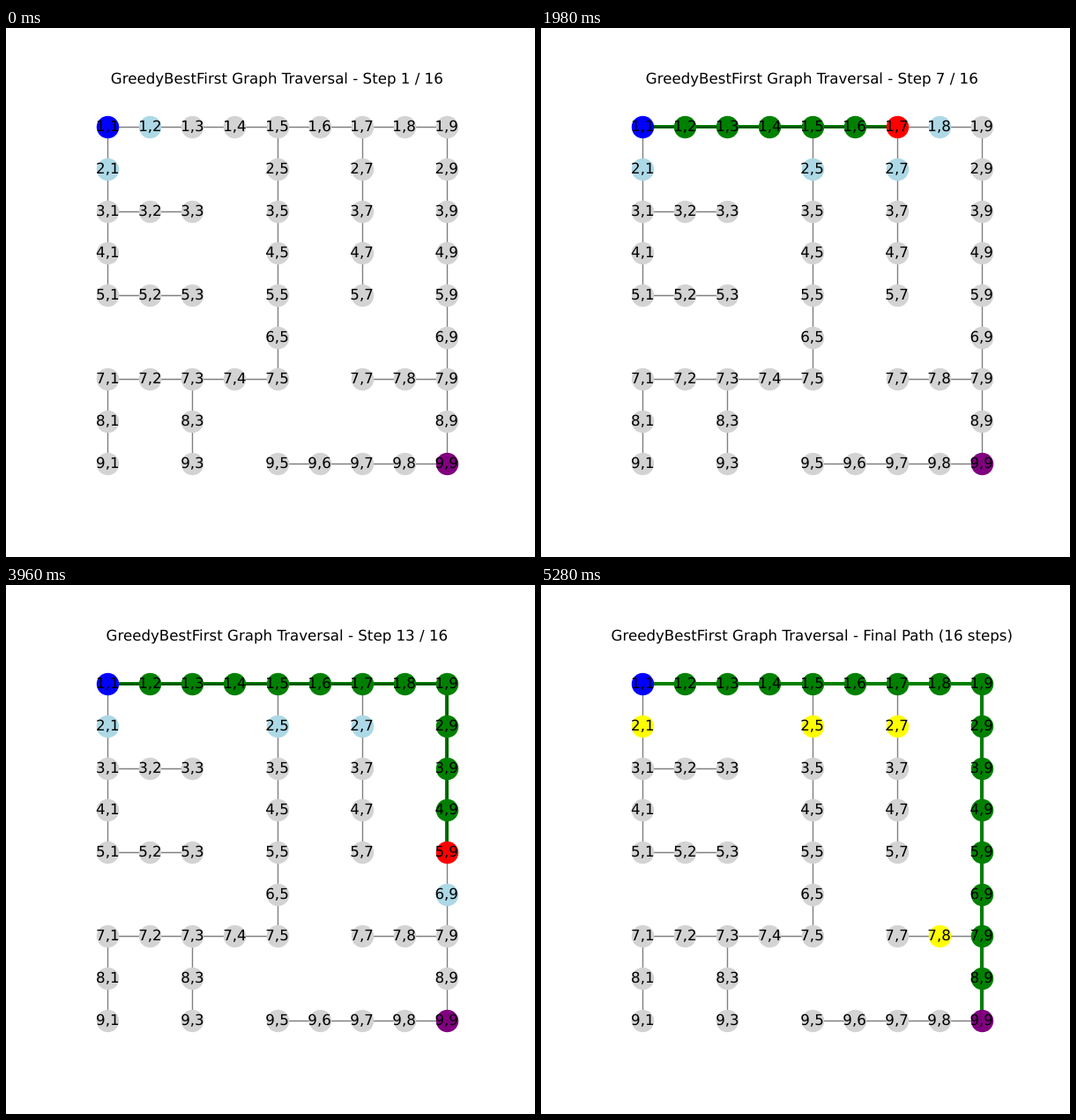
Recreate the animation shown at these times as an HTML page. Size 600 px wide and 600 px high, loop 5610 ms.

```html
<!DOCTYPE html>
<html lang="en">
<head>
<meta charset="utf-8">
<title>Graph traversal</title>
<style>
  html, body { margin: 0; width: 100%; height: 100%; overflow: hidden; background: #fff; }
  svg { display: block; width: 600px; height: 600px; }
  text { font: 16.667px "DejaVu Sans", sans-serif; text-anchor: middle; text-rendering: geometricPrecision; }
</style>
</head>
<body>
<svg id="stage" viewBox="0 0 600 600"></svg>
<script>
const STEP_MS = 330, STEPS = 16;
const stage = document.getElementById('stage');

// Straight corridors of the maze: [row, column, row, column]
const corridors = [
  [1, 1, 1, 9], [3, 1, 3, 3], [5, 1, 5, 3], [7, 1, 7, 5], [7, 7, 7, 9], [9, 5, 9, 9],
  [1, 1, 5, 1], [7, 1, 9, 1], [7, 3, 9, 3], [1, 5, 7, 5], [1, 7, 5, 7], [1, 9, 9, 9]
];

const exactX = col => 307.5 + (col - 5) * 465 / 1.21 / 8;
const nodeX = col => Math.round(exactX(col));
const nodeY = row => Math.round(303 + (row - 5) * 462 / 1.21 / 8);

function add(tag, attrs, parent = stage) {
  const el = document.createElementNS('http://www.w3.org/2000/svg', tag);
  for (const name in attrs) el.setAttribute(name, attrs[name]);
  return parent.appendChild(el);
}

const nodes = new Map();
const keyOf = (row, col) => row + ',' + col;

function nodeAt(row, col) {
  const key = keyOf(row, col);
  if (!nodes.has(key)) nodes.set(key, { key, row, col, links: [] });
  return nodes.get(key);
}

for (const [r1, c1, r2, c2] of corridors) {
  const dr = Math.sign(r2 - r1), dc = Math.sign(c2 - c1);
  for (let r = r1, c = c1; r !== r2 || c !== c2; r += dr, c += dc) {
    const a = nodeAt(r, c), b = nodeAt(r + dr, c + dc);
    a.links.push(b);
    b.links.push(a);
  }
}

const route = Array.from({ length: STEPS + 1 }, (_, i) =>
  nodeAt(Math.max(1, i - 7), Math.min(9, i + 1)));
const start = route[0], goal = route[STEPS];

const pathStyle = { fill: 'none', stroke: '#008000', 'stroke-width': 4.17 };
const pathBelow = add('polyline', pathStyle);
for (const [r1, c1, r2, c2] of corridors) {
  add('line', {
    x1: nodeX(c1) + .5, y1: nodeY(r1) + .5, x2: nodeX(c2) + .5, y2: nodeY(r2) + .5,
    stroke: '#000', 'stroke-opacity': .5, 'stroke-width': 1.39
  });
}
const pathAbove = add('polyline', pathStyle);

for (const node of nodes.values()) {
  node.disc = add('circle', { cx: nodeX(node.col) + .5, cy: nodeY(node.row) + .5, r: 12.72 });
}
for (const node of nodes.values()) {
  add('text', { x: exactX(node.col), y: nodeY(node.row) + 5 }).textContent = node.key;
}
const title = add('text', { x: 307.3, y: 63 });

function colorOf(node, visited, current, final) {
  if (node === start) return '#0000ff';
  if (node === goal) return '#800080';
  if (node === current) return '#ff0000';
  if (visited.has(node)) return '#008000';
  if (node.links.some(n => visited.has(n) && n !== goal)) return final ? '#ffff00' : '#add8e6';
  return '#d3d3d3';
}

function render(step) {
  const final = step > STEPS;
  const walked = route.slice(0, step);
  const visited = new Set(walked);
  const points = walked.map(n => nodeX(n.col) + ',' + nodeY(n.row)).join(' ');
  pathBelow.setAttribute('points', final ? '' : points);
  pathAbove.setAttribute('points', final ? points : '');
  for (const node of nodes.values()) {
    node.disc.setAttribute('fill', colorOf(node, visited, walked[step - 1], final));
  }
  title.textContent = 'GreedyBestFirst Graph Traversal - ' +
    (final ? `Final Path (${STEPS} steps)` : `Step ${step} / ${STEPS}`);
}

const origin = performance.now();
let shown = 0;

function tick() {
  const elapsed = performance.now() - origin;
  const step = Math.floor(elapsed / STEP_MS) % (STEPS + 1) + 1;
  if (step !== shown) render(shown = step);
  requestAnimationFrame(tick);
}
tick();
</script>
</body>
</html>
```
